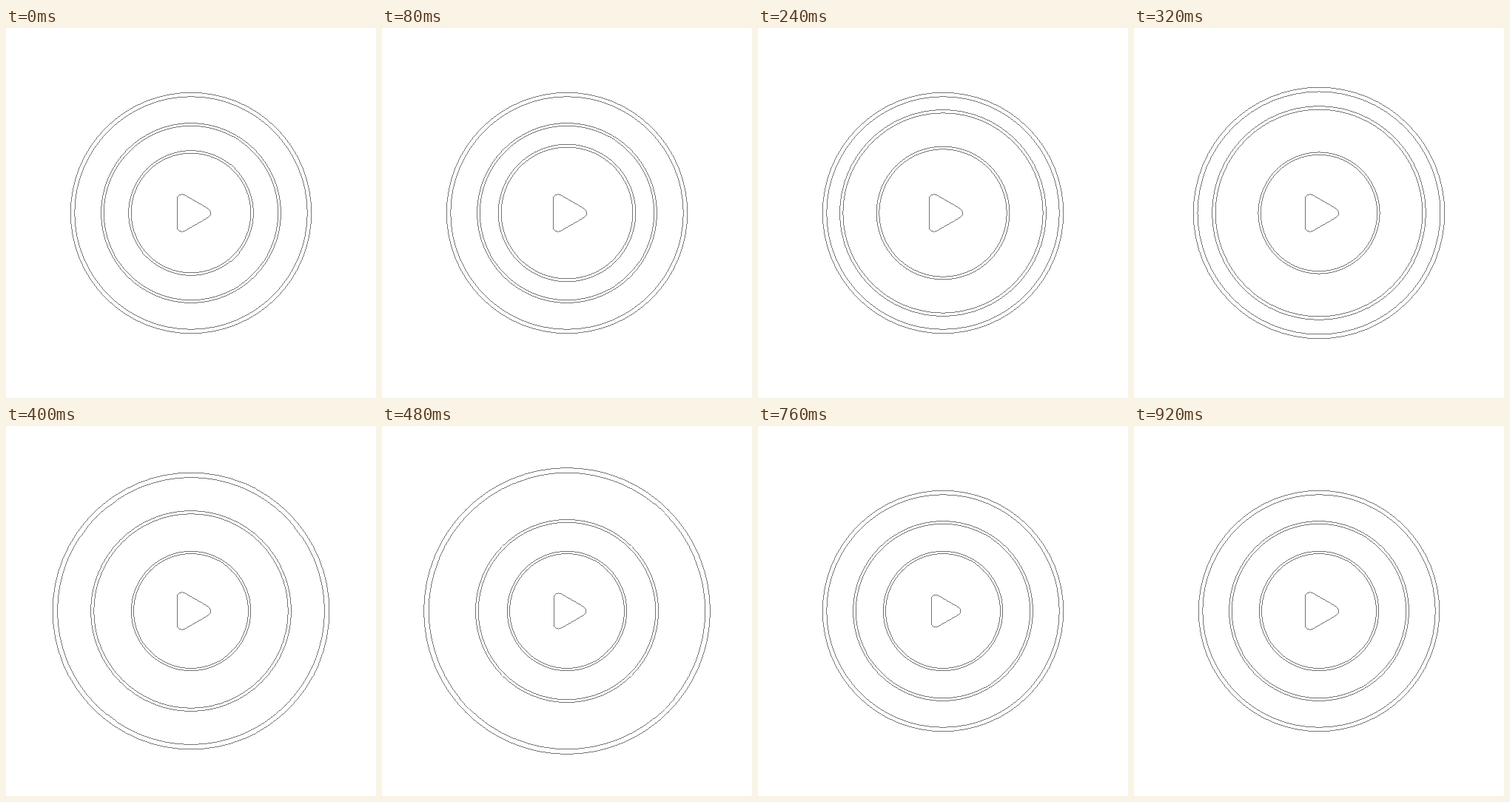
An HTML page for the animation above (1040 ms loop, 500 by 500 pixels).

```html
<!DOCTYPE html>
<html lang="en">
<head>
<meta charset="utf-8">
<title>Play pulse</title>
<style>
  html, body { margin: 0; width: 100%; height: 100%; overflow: hidden; background: #fff; }
  svg { display: block; width: 100vw; height: 100vh; }
  circle, path { fill: none; stroke: #000; stroke-width: .55; shape-rendering: crispEdges; }
  path { vector-effect: non-scaling-stroke; }
</style>
</head>
<body>
<svg viewBox="0 0 500 500">
  <g id="rings"></g>
  <path id="play" d="M-23 -18.3 A6.9 6.9 0 0 1 -12.65 -24.28 L19.05 -5.98 A6.9 6.9 0 0 1 19.05 5.98 L-12.65 24.28 A6.9 6.9 0 0 1 -23 18.3 Z"/>
</svg>
<script>
const LOOP = 1040, STEP = 40, LAST = 920;
const GROW = 0.19, SHRINK = 0.23;
const INSET = 0.25; // the thin lines run just inside each ring's edges

// Each ring: outer radius, inner radius, time of its peak
const rings = [
  [81, 77.2, 146],
  [121.7, 117.5, 307],
  [163, 157, 467]
];

const group = document.getElementById('rings');
const play = document.getElementById('play');

function addCircle() {
  const c = document.createElementNS('http://www.w3.org/2000/svg', 'circle');
  c.setAttribute('cx', 250);
  c.setAttribute('cy', 250);
  return group.appendChild(c);
}

const pairs = rings.map(() => [addCircle(), addCircle()]);

// Smooth bump: 1 at the peak, 0 beyond half a width on either side
function bump(t, peak, half) {
  const d = Math.min(Math.abs(t - peak) / half, 1);
  return (1 + Math.cos(Math.PI * d)) / 2;
}

function draw(t) {
  rings.forEach(([outer, inner, peak], i) => {
    const scale = 1 + GROW * bump(t, peak, 215);
    pairs[i][0].setAttribute('r', outer * scale - INSET);
    pairs[i][1].setAttribute('r', inner * scale + INSET);
  });
  const s = 1 - SHRINK * bump(t, 652, 240);
  play.setAttribute('transform', `translate(254.2 250) scale(${s})`);
}

const start = performance.now();
function tick(now) {
  const t = Math.max(0, now - start) % LOOP;
  draw(Math.min(Math.floor(t / STEP) * STEP, LAST));
  requestAnimationFrame(tick);
}
draw(0);
requestAnimationFrame(tick);
</script>
</body>
</html>
```
